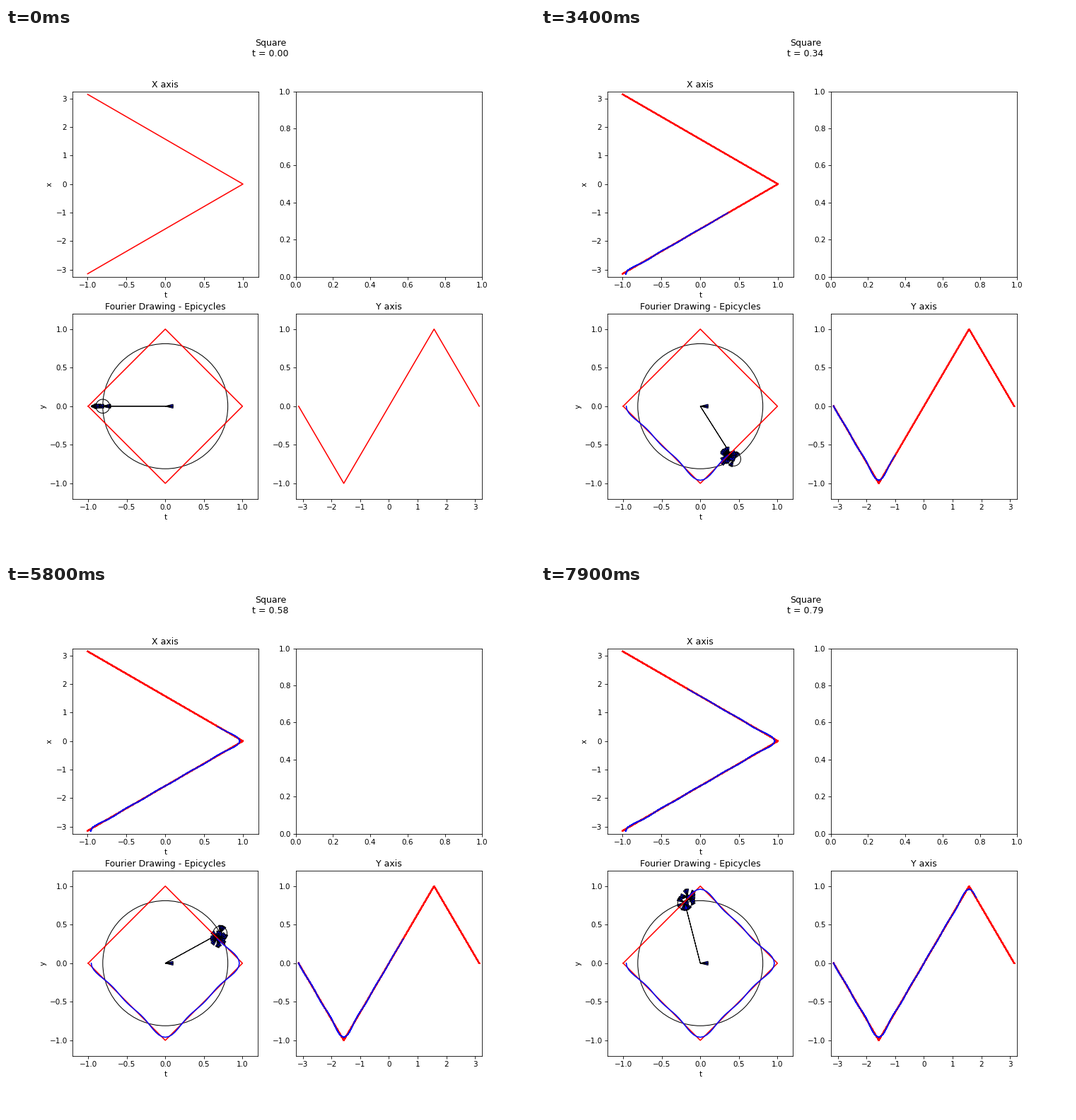
A matplotlib script for the animation above (8000 ms loop, 748 by 748 pixels).

```python
import numpy as np
import matplotlib.pyplot as plt
from matplotlib.animation import FuncAnimation
from matplotlib.patches import Circle, FancyArrow

FRAMES = 80
STEPS = 100          # frames in one full turn
ORDER = 10           # highest harmonic
TINY = 1e-9          # vanishing harmonics keep only a direction


def coefficient(n):
    """Fourier coefficient of the diamond; it is nonzero for n = 1, -3, 5, ..."""
    if n % 4 == 1:
        return -8 / (np.pi * n) ** 2
    return TINY if n in (-1, 3) else -TINY


harmonics = [0] + [s * n for n in range(1, ORDER + 1) for s in (1, -1)]
coefs = np.array([coefficient(n) for n in harmonics])


def chain(frame):
    """Joints of the epicycle arm, from the centre to the pen."""
    theta = 2 * np.pi * frame / STEPS
    steps = coefs * np.exp(1j * np.array(harmonics) * theta)
    return np.concatenate([[0], np.cumsum(steps)]), steps


pen = np.array([chain(f)[0][-1] for f in range(FRAMES)])
time = -np.pi + 2 * np.pi * np.arange(FRAMES) / STEPS

# exact shape
corner_t = np.linspace(-np.pi, np.pi, 5)
corner_x = np.array([-1, 0, 1, 0, -1])
corner_y = np.array([0, -1, 0, 1, 0])

fig, ((ax_x, ax_blank), (ax_epi, ax_y)) = plt.subplots(
    2, 2, figsize=(10, 10), dpi=74.8)
title = fig.suptitle("Square\nt = 0.00")

LIM, T_LIM = 1.2, np.pi + 0.1
ax_x.set(title="X axis", xlabel="t", ylabel="x",
         xlim=(-LIM, LIM), ylim=(-T_LIM, T_LIM))
ax_y.set(title="Y axis", xlim=(-T_LIM, T_LIM), ylim=(-LIM, LIM))
ax_epi.set(title="Fourier Drawing - Epicycles", xlabel="t", ylabel="y",
           xlim=(-LIM, LIM), ylim=(-LIM, LIM), aspect="equal")

# the two side plots are drawn over again at each step, so lines pile up
layers = []
for f in range(FRAMES):
    past = slice(0, f + 1)
    layers.append(
        ax_x.plot(corner_x, corner_t, "r")
        + ax_x.plot(pen.real[past], time[past], "b")
        + ax_y.plot(corner_t, corner_y, "r")
        + ax_y.plot(time[past], pen.imag[past], "b"))

arms = []
for c in coefs:
    circle = ax_epi.add_patch(Circle((0, 0), abs(c), fill=False))
    arrow = ax_epi.add_patch(FancyArrow(
        0, 0, c, 0, width=0.001, head_width=0.05, head_length=0.1,
        length_includes_head=True, fc="blue", ec="black"))
    arms.append((circle, arrow))
ax_epi.plot(corner_x, corner_y, "r")
trace, = ax_epi.plot([], [], "b")


def update(frame):
    title.set_text(f"Square\nt = {frame / STEPS:.2f}")
    for f, lines in enumerate(layers):
        for line in lines:
            line.set_visible(f <= frame)
    joints, steps = chain(frame)
    for (circle, arrow), p, d in zip(arms, joints, steps):
        circle.center = p.real, p.imag
        arrow.set_data(x=p.real, y=p.imag, dx=d.real, dy=d.imag)
    trace.set_data(pen.real[:frame + 1], pen.imag[:frame + 1])


anim = FuncAnimation(fig, update, frames=FRAMES, init_func=lambda: update(0),
                     interval=100, repeat=True, repeat_delay=0)
plt.show()
```
